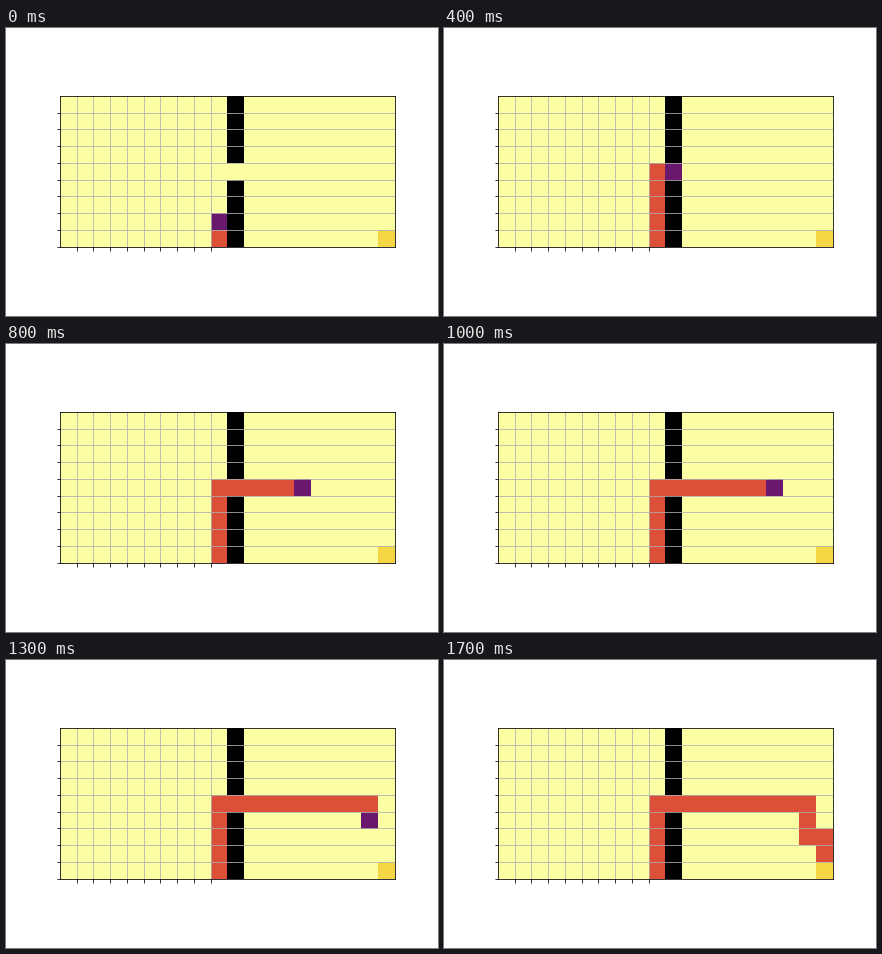
Write a matplotlib script that moves like this. It is 432 by 288 pixels and loops after 1800 ms.

```python
import matplotlib.pyplot as plt
import numpy as np
from matplotlib.animation import FuncAnimation

ROWS, COLS = 9, 20
START, GOAL = (8, 9), (8, 19)
AGENT, TRAIL, TARGET, WALL, FREE = 0.3, 0.6, 0.9, 0.0, 1.0
UP, DOWN, RIGHT = (-1, 0), (1, 0), (0, 1)
MOVES = [UP] * 4 + [RIGHT] * 9 + [DOWN] * 2 + [RIGHT] + [DOWN] * 2

path = [START]
for dr, dc in MOVES:
    r, c = path[-1]
    path.append((r + dr, c + dc))


def grid_at(step):
    """Grid values after step + 1 moves; the goal stays on top."""
    grid = np.full((ROWS, COLS), FREE)
    grid[:, 10] = WALL
    grid[4, 10] = FREE
    for cell in path[:step + 1]:
        grid[cell] = TRAIL
    grid[path[step + 1]] = AGENT
    grid[GOAL] = TARGET
    return grid


fig, ax = plt.subplots(figsize=(6, 4), dpi=72)
fig.subplots_adjust(left=0.125, right=0.9, bottom=0.125, top=0.88)
image = ax.imshow(grid_at(0), cmap="inferno", vmin=0, vmax=1)
ax.set_xticks(np.arange(0.5, 9))
ax.set_yticks(np.arange(0.5, 9))
ax.set_xticklabels([])
ax.set_yticklabels([])
ax.grid(True, color="#b0b0b0", linewidth=0.8)


def update(step):
    image.set_data(grid_at(step))
    return [image]


anim = FuncAnimation(fig, update, frames=len(MOVES), interval=100,
                     repeat=True, repeat_delay=0)
plt.show()
```
